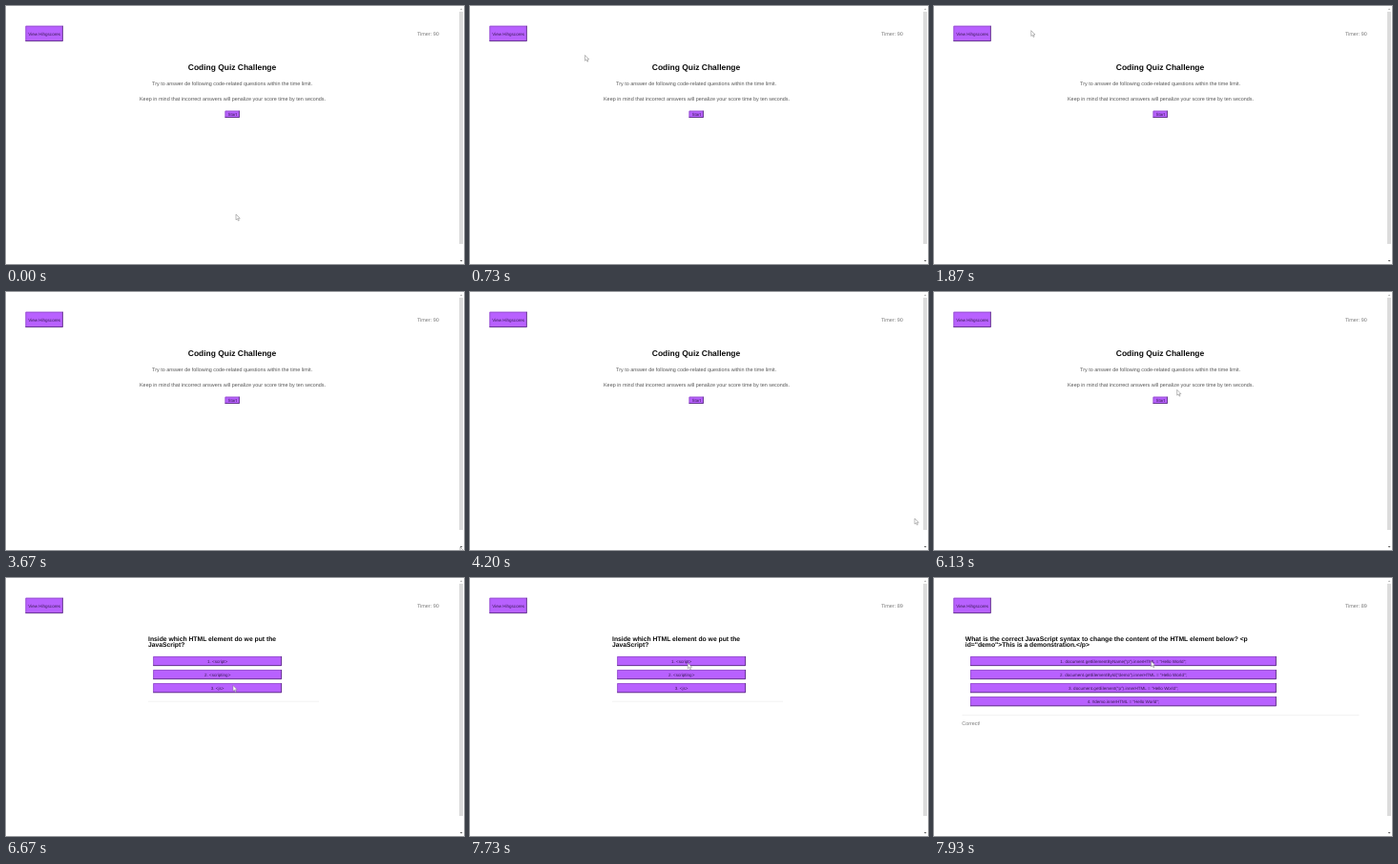
Write an HTML page that moves like this. It is 480 by 270 pixels and loops after 8 s.

```html
<!DOCTYPE html>
<html lang="en">
<head>
<meta charset="utf-8">
<title>Coding Quiz</title>
<style>
  html, body { margin: 0; width: 100%; height: 100%; overflow: hidden; background: #fff; }
  svg { display: block; width: 480px; height: 270px; }
  text {
    font-family: "Liberation Sans", Arial, sans-serif;
    text-rendering: geometricPrecision;
    white-space: pre;
  }
  .title { font-size: 8.45px; font-weight: 700; fill: #0a0a0a; }
  .question { font-size: 6.77px; font-weight: 700; fill: #0a0a0a; }
  .body { font-size: 5.43px; fill: #555; }
  .note { font-size: 5.43px; fill: #777; }
  .label { font-size: 4.55px; fill: #3a1c55; }
  .mid { text-anchor: middle; }
</style>
</head>
<body>
<svg id="stage" viewBox="0 0 480 270"></svg>
<script>
const LOOP = 8000, STEP = 1000 / 15;
const PURPLE = '#b861ff', LIGHT = '#8c4bc2', DARK = '#4a2768';
const stage = document.getElementById('stage');

function add(parent, tag, attrs = {}, content) {
  const el = document.createElementNS('http://www.w3.org/2000/svg', tag);
  for (const key in attrs) el.setAttribute(key, attrs[key]);
  if (content) el.textContent = content;
  return parent.appendChild(el);
}

const write = (parent, cls, x, y, str) => add(parent, 'text', { class: cls, x, y }, str);

const rule = (parent, x, y, width) =>
  add(parent, 'rect', { x, y, width, height: 0.6, fill: '#e9e9e9' });

// Outset button; the returned function swaps the bevel while pressed.
function button(parent, x, y, w, h, str) {
  const r = x + w, b = y + h;
  add(parent, 'rect', { x, y, width: w, height: h, fill: PURPLE });
  const edge = d => add(parent, 'path', { d, fill: 'none', 'stroke-width': 0.75 });
  const upper = edge(`M${x + .35} ${b}V${y + .35}H${r}`);
  const lower = edge(`M${x} ${b - .35}H${r - .35}V${y}`);
  write(parent, 'label mid', x + w / 2, y + h / 2 + 1.6, str);
  const press = down => {
    upper.setAttribute('stroke', down ? DARK : LIGHT);
    lower.setAttribute('stroke', down ? LIGHT : DARK);
  };
  press(false);
  return press;
}

function quiz(left, width, lines, answers) {
  const g = add(stage, 'g');
  lines.forEach((line, i) => write(g, 'question', left, 65.7 + i * 6.6, line));
  const presses = answers.map((a, i) =>
    button(g, left + 5.3, 82 + i * 14.05, width, 10, `${i + 1}. ${a}`));
  return { g, presses };
}

// Page frame
button(stage, 20.5, 20.8, 39.2, 16.2, 'View Hihgscores');
const timer = write(stage, 'note', 431, 31, 'Timer: 90');
const thumb = add(stage, 'rect', { x: 475, y: 6, width: 4, height: 243 });
add(stage, 'path', { d: 'M475.9 4L477.1 2.6L478.3 4Z', fill: '#aaa' });
add(stage, 'path', { d: 'M475.7 266L477.1 267.6L478.5 266Z', fill: '#555' });

// Intro
const intro = add(stage, 'g');
write(intro, 'title mid', 237, 67.2, 'Coding Quiz Challenge');
write(intro, 'body mid', 237, 82.5, 'Try to answer de following code-related questions within the time limit.');
write(intro, 'body mid', 237.5, 99.3, 'Keep in mind that incorrect answers will penalize your score time by ten seconds.');
const pressStart = button(intro, 229.6, 109.7, 15.2, 7.2, 'Start');

// Questions
const first = quiz(149, 134.7,
  ['Inside which HTML element do we put the', 'JavaScript?'],
  ['<script>', '<scripting>', '<js>']);
rule(first.g, 149, 128.8, 179);

const second = quiz(32.8, 320.7,
  ['What is the correct JavaScript syntax to change the content of the HTML element below? <p',
   'id="demo">This is a demonstration.</p>'],
  ['document.getElementByName("p").innerHTML = "Hello World";',
   'document.getElementById("demo").innerHTML = "Hello World";',
   'document.getElement("p").innerHTML = "Hello World";',
   '#demo.innerHTML = "Hello World";']);
rule(second.g, 29.5, 143, 416);
write(second.g, 'note', 29.3, 154, 'Correct!');

const cursor = add(stage, 'path', {
  d: 'M0 0V5.8L1.4 4.6L2.4 6.8L3.3 6.4L2.4 4.3H4.2Z',
  fill: '#fff', stroke: '#777', 'stroke-width': 0.5, 'stroke-linejoin': 'round'
});

// Pointer stops
const point = (x, y) => ({ x, y });
const home = point(241, 218), menu = point(102, 26), corner = point(476, 267);
const edge = point(466, 237), low = point(361, 256), side = point(0, 258);
const go = point(238, 112.5), answer = point(227.5, 87);

// Easings: windUp draws back before leaving, overshoot swings past its goal.
const BACK = 1.4;
const smooth = u => u * u * (3 - 2 * u);
const windUp = u => u * u * ((BACK + 1) * u - BACK);
const overshoot = u => 1 - windUp(1 - u);

// The pointer rests where a move ends, unless that move leaves the page.
const move = (begin, end, from, to, ease = smooth, leaves = false) =>
  ({ begin, end, from, to, ease, leaves });
const moves = [
  move(70, 930, home, menu),
  move(1850, 2330, menu, home, windUp),
  move(2660, 2790, home, point(270, 244), smooth, true),
  move(3660, 4200, corner, edge),
  move(4330, 5200, edge, low, windUp),
  move(5200, 5330, low, point(320, 275), smooth, true),
  move(5460, 6530, side, go, overshoot),
  move(7130, 7860, go, answer)
];

function pointer(t) {
  const m = moves.findLast(m => t >= m.begin) || moves[0];
  if (m.leaves && t >= m.end) return null;
  const u = Math.min(1, Math.max(0, (t - m.begin) / (m.end - m.begin)));
  const k = m.ease(u);
  return point(m.from.x + (m.to.x - m.from.x) * k, m.from.y + (m.to.y - m.from.y) * k);
}

const show = (el, on) => el.setAttribute('visibility', on ? 'visible' : 'hidden');

function draw(now) {
  // The picture refreshes 15 times a second.
  const t = Math.floor((now % LOOP + 4) / STEP) * STEP % LOOP;
  const p = pointer(t);
  show(cursor, p);
  if (p) cursor.setAttribute('transform', `translate(${p.x.toFixed(1)} ${p.y.toFixed(1)})`);
  const hover = p && p.x >= 472.5 && p.y < 249;
  thumb.setAttribute('fill', hover ? '#b5b5b5' : '#dcdcdc');
  show(intro, t < 6660);
  show(first.g, t >= 6660 && t < 7930);
  show(second.g, t >= 7930);
  pressStart(t >= 6530 && t < 6660);
  first.presses[0](t >= 7860 && t < 7930);
  timer.textContent = t < 7660 ? 'Timer: 90' : 'Timer: 89';
}

const start = performance.now();
function tick() {
  draw(performance.now() - start);
  requestAnimationFrame(tick);
}
tick();
</script>
</body>
</html>
```
